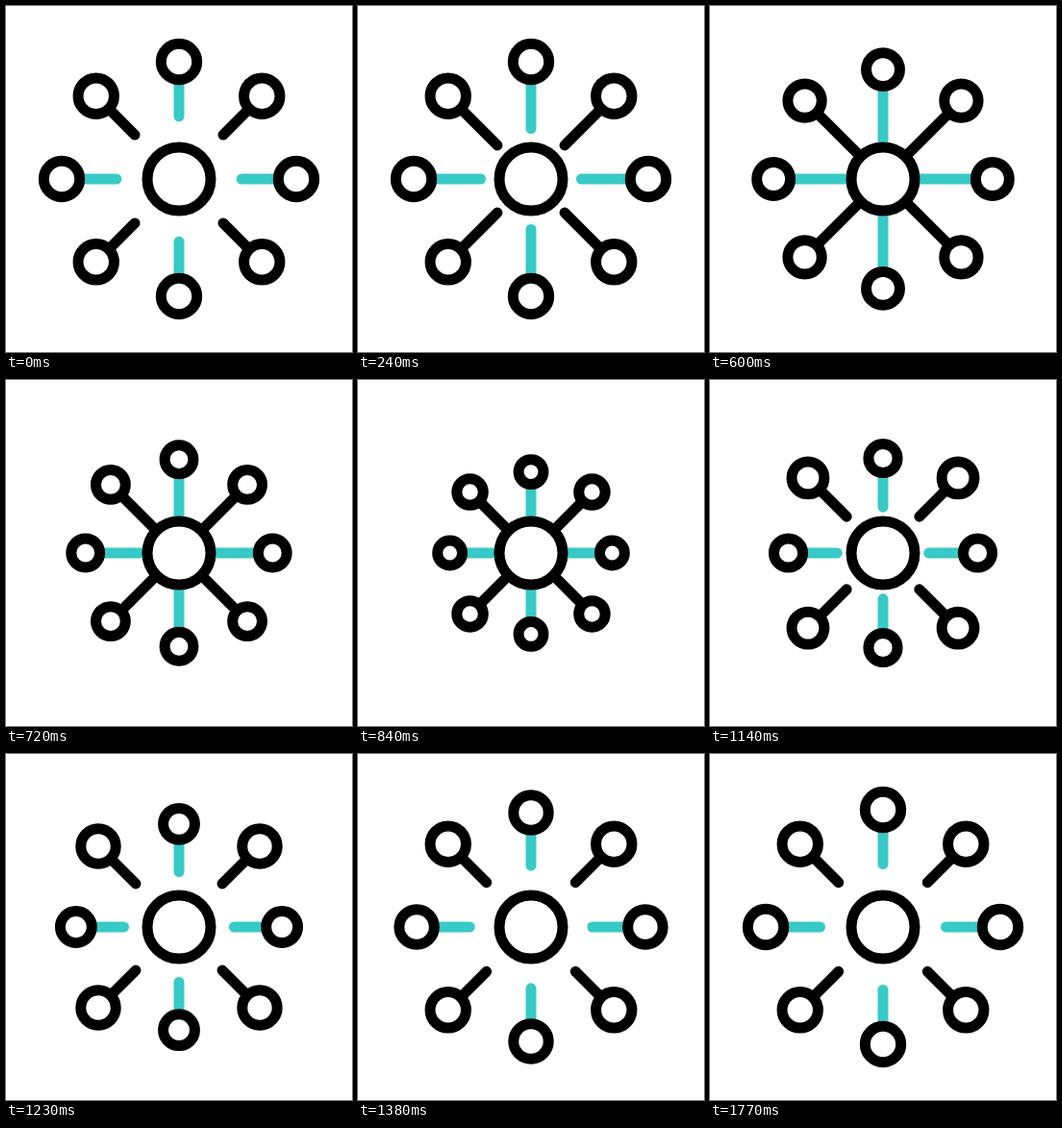
Animation, 360 px wide and 360 px high, one loop 1800 ms. Source, as an HTML page:

```html
<!DOCTYPE html>
<html lang="en">
<head>
<meta charset="utf-8">
<title>Hub and nodes</title>
<style>
  html, body { margin: 0; width: 100%; height: 100%; overflow: hidden; background: #fff; }
  svg { display: block; width: 100vw; height: 100vh; }
</style>
</head>
<body>
<svg id="stage" viewBox="0 0 360 360" fill="#fff" stroke="#000" stroke-width="11" stroke-linecap="round"></svg>
<script>
const LOOP = 1800;
const LEAD = 60; // the spokes begin to grow just before the loop restarts
const FAR = 122, NODE_RADIUS = 18.7, HUB_RADIUS = 33, SPOKE_REST = 65.5;
const stage = document.getElementById("stage");

// Times are [start, end] in ms; near is the closest distance of a node.
const straight = { near: 83, grow: [-37, 603], pull: [482, 887], push: [880, 1485], shrink: [885, 1242] };
const diagonal = { near: 89, grow: [-40, 530], pull: [487, 876], push: [880, 1315], shrink: [885, 1242] };

function add(parent, tag, attrs) {
  const el = document.createElementNS("http://www.w3.org/2000/svg", tag);
  set(el, attrs);
  parent.appendChild(el);
  return el;
}

function set(el, attrs) {
  for (const name in attrs) el.setAttribute(name, attrs[name]);
}

function ease(time, [start, end]) {
  const x = Math.min(1, Math.max(0, (time - start) / (end - start)));
  return x * x * (3 - 2 * x);
}

const arms = Array.from({ length: 8 }, (_, i) => {
  const group = add(stage, "g", { transform: `translate(180 180) rotate(${i * 45})` });
  return {
    motion: i % 2 ? diagonal : straight,
    spoke: add(group, "line", { y1: 0, y2: 0, stroke: i % 2 ? "#000" : "#38cac8" }),
    node: add(group, "circle", { cy: 0 })
  };
});
add(stage, "circle", { cx: 180, cy: 180, r: HUB_RADIUS });

function draw(ms) {
  const time = (ms + LEAD) % LOOP - LEAD;
  for (const { motion, spoke, node } of arms) {
    const closeness = time < 882 ? ease(time, motion.pull) : 1 - ease(time, motion.push);
    const reach = time < 885 ? ease(time, motion.grow) : 1 - ease(time, motion.shrink);
    const distance = FAR - (FAR - motion.near) * closeness;
    const scale = distance / FAR;
    const radius = NODE_RADIUS * scale;
    const tip = (SPOKE_REST - (SPOKE_REST - HUB_RADIUS) * reach) * scale;
    set(spoke, { x1: tip, x2: distance - radius });
    set(node, { cx: distance, r: radius });
  }
}

const begin = performance.now();
function tick() {
  draw(performance.now() - begin);
  requestAnimationFrame(tick);
}
draw(0);
requestAnimationFrame(tick);
</script>
</body>
</html>
```
